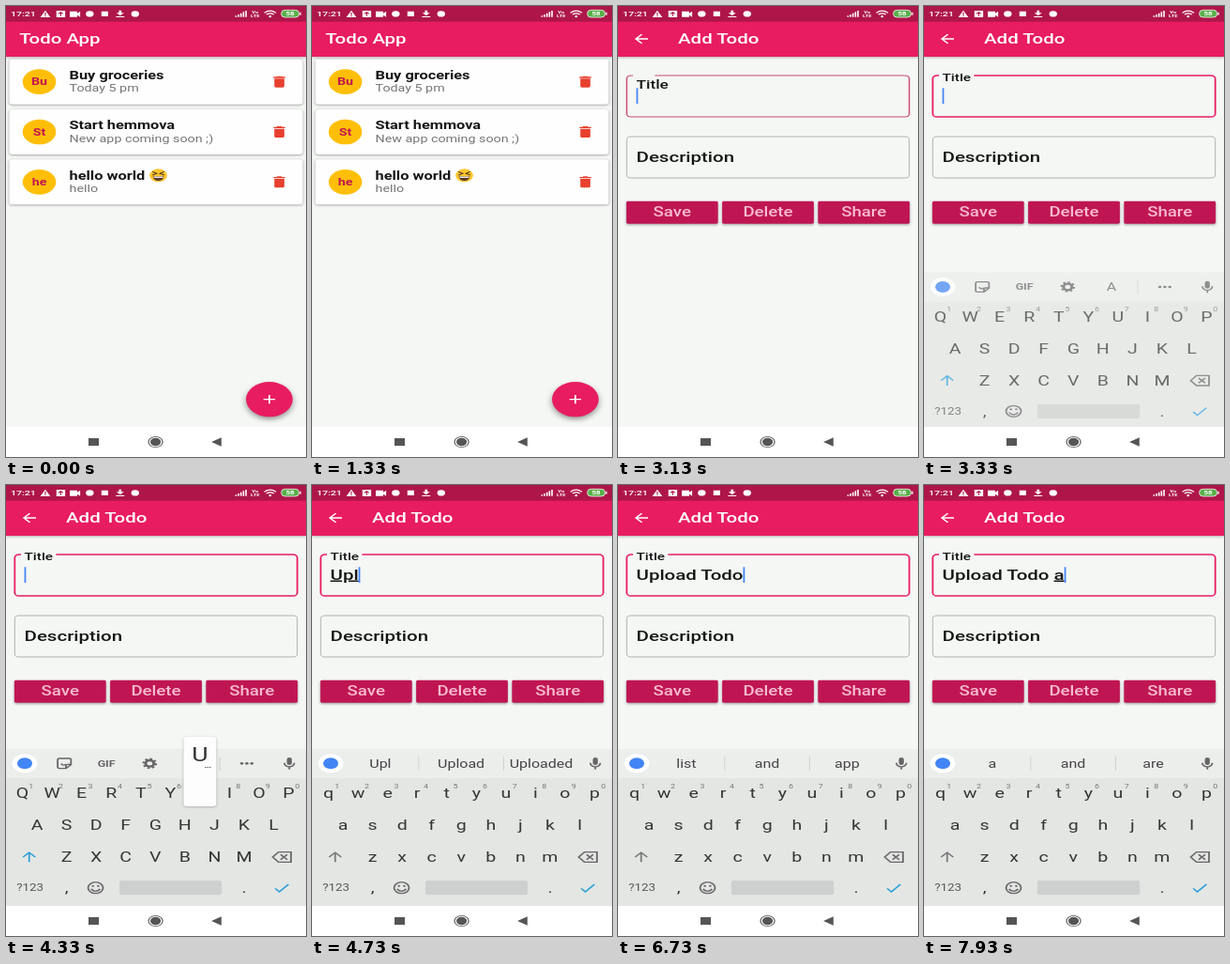
Write an HTML page that moves like this. It is 320 px wide and 480 px high and loops after 8000 ms.

```html
<!DOCTYPE html>
<html lang="en">
<head>
<meta charset="utf-8">
<title>Todo app</title>
<style>
  html, body { margin: 0; height: 100%; overflow: hidden; background: #f5f7f5; }
  svg { display: block; width: 100vw; height: 100vh; font-family: Roboto, sans-serif; }
  text { white-space: pre; }
  .bar { fill: #e81c60; filter: drop-shadow(0 1px 2px #0005); }
  .heading { font-size: 23px; font-weight: 500; fill: #fff; }
  .card { fill: #fdfefd; filter: drop-shadow(0 1px 1.5px #0006); }
  .name { font-size: 18.4px; font-weight: 700; fill: #161616; }
  .note { font-size: 16.1px; fill: #757575; }
  .badge { font-size: 16px; font-weight: 700; fill: #c4144f; }
  .button { fill: #bf1653; filter: drop-shadow(0 2px 1.5px #0005); }
  .caption { font-size: 21px; font-weight: 500; fill: #f8bbd0; }
  .field { font-size: 23px; font-weight: 500; fill: #141614; }
  .word { font-size: 18px; fill: #444; }
  .key { font-size: 22px; fill: #343634; }
  .hint { font-size: 10px; fill: #777; }
  .mid { text-anchor: middle; }
  .line { fill: none; stroke: #666; stroke-width: 2; }
</style>
</head>
<body>
<!-- Laid out on a 360 x 720 phone screen, squeezed onto the stage -->
<svg viewBox="0 0 360 720" preserveAspectRatio="none">
  <g id="listPage">
    <rect width="360" height="720" fill="#f5f7f5"/>
    <rect class="bar" width="360" height="81"/>
    <text class="heading" x="16" y="60.5">Todo App</text>
    <g id="cards"></g>
    <g transform="translate(182.8 270.5)" fill="none" stroke="#4e3322" stroke-width="1.5">
      <circle r="10.5" fill="#fcc62f" stroke="none"/>
      <path d="M-7-6l5 3-5 2.500M7-6l-5 3 5 2.500"/>
      <path d="M-6.500 1.500h13a6.500 7 0 0 1-13 0z" fill="#5b3a28" stroke="none"/>
      <path d="M-5.500 2.800h11" stroke="#fff" stroke-width="2"/>
    </g>
    <circle cx="316" cy="628" r="28" fill="#e81c60" style="filter:drop-shadow(0 4px 4px #0006)"/>
    <path d="M309 628h14M316 621v14" stroke="#fff" stroke-width="2"/>
  </g>

  <g id="addPage">
    <rect width="360" height="720" fill="#f5f7f5"/>
    <rect class="bar" width="360" height="81"/>
    <path transform="translate(16 40.500)" fill="#fff" d="M20 11H7.830l5.590-5.590L12 4l-8 8 8 8 1.410-1.410L7.830 13H20z"/>
    <text class="heading" x="72" y="60.5">Add Todo</text>
    <path id="titleBorder" fill="none"/>
    <path id="descBorder" fill="none" stroke="#9c9e9c"/>
    <text class="field" id="label">Title</text>
    <text class="field" x="22" y="249">Description</text>
    <text class="field" x="22" y="151"><tspan id="typed"></tspan><tspan id="composing" text-decoration="underline"></tspan></text>
    <rect id="cursor" y="131" width="2" height="25" fill="#4285f4"/>
    <g id="buttons"></g>
  </g>

  <g id="keyboard">
    <rect y="421.500" width="360" height="260" fill="#e4e6e4"/>
    <rect y="421.500" width="360" height="46.500" fill="#eceeec"/>
    <circle cx="22.500" cy="444.500" r="15" fill="#fff"/>
    <circle cx="22.500" cy="444.500" r="9" fill="#4285f4"/>
    <g id="tools">
      <g class="line" stroke-width="1.700">
        <path d="M64 436.500h12q2 0 2 2v8l-6 6h-8q-2 0-2-2v-12q0-2 2-2zM78 446h-4q-2 0-2 2v4M66 445q3 4 6 1"/>
        <circle cx="172.500" cy="444.500" r="5" stroke-width="3.500"/>
        <circle cx="172.500" cy="444.500" r="7.500" stroke-width="2.500" pathLength="16" stroke-dasharray="1"/>
        <path d="M256.500 434v22" stroke="#c8cac8" stroke-width="1"/>
      </g>
      <text class="mid" x="120.500" y="449.500" font-size="14" font-weight="700" fill="#666">GIF</text>
      <text class="mid" x="225" y="451" font-size="18" fill="#666">A</text>
      <g fill="#666"><circle cx="283" cy="444.500" r="2"/><circle cx="289" cy="444.500" r="2"/><circle cx="295" cy="444.500" r="2"/></g>
    </g>
    <g id="words"><path d="M128 433v23M230 433v23" stroke="#cbcdcb"/></g>
    <rect x="337" y="435" width="6" height="12" rx="3" fill="#666"/>
    <path class="line" d="M334 443.500a6 6.500 0 0 0 12 0M340 450v4"/>
    <g id="keys"></g>
    <path id="shift" class="line" d="M27.800 602v-14M20.500 594l7.300-7.300 7.300 7.300"/>
    <path class="line" stroke-width="1.700" d="M327 586h15v16h-15l-7-8zM329.500 590l8 8M337.500 590l-8 8"/>
    <text class="mid" x="28.700" y="648.500" font-size="15" fill="#555">?123</text>
    <text class="key mid" x="72.700" y="651">,</text>
    <text class="key mid" x="286" y="651">.</text>
    <g class="line" stroke-width="1.700"><circle cx="107.500" cy="643" r="9"/><path d="M102 645q5.500 7 11 0"/></g>
    <circle cx="104.300" cy="640" r="1.500" fill="#666"/><circle cx="110.700" cy="640" r="1.500" fill="#666"/>
    <rect x="136" y="631.500" width="123" height="23" rx="3" fill="#cdd0ce"/>
    <path class="line" d="M323 644l5 5.500 11-12" style="stroke:#2b9fd8"/>
    <g id="popup" class="mid">
      <rect x="-19.500" y="-98" width="39" height="111" rx="4" fill="#fcfdfc" style="filter:drop-shadow(0 1px 1.500px #0004)"/>
      <text id="popupLetter" y="-59" font-size="30" fill="#333"></text>
      <text x="9.500" y="-48" font-size="12" font-weight="700" fill="#555">…</text>
    </g>
  </g>

  <rect y="672" width="360" height="48" fill="#fff"/>
  <g fill="#555">
    <path d="M99 690h12.400v12H99zM258.500 689v14l-12-7z"/>
    <circle cx="179.500" cy="696" r="6.300"/>
    <circle cx="179.500" cy="696" r="8.500" fill="none" stroke="#555" stroke-width="1.300"/>
  </g>

  <rect width="360" height="25" fill="#ae1649"/>
  <g fill="#fff">
    <text x="5.500" y="17" font-size="12" font-weight="500">17:21</text>
    <path d="M47.200 7l6 11h-12zM60.500 7.500h10.500v10.500H60.500zM76.500 8.500h9v3l3.500-3v9l-3.500-3v3h-9zM114.500 8.500h8v8h-8zM135.500 7h3v4h3l-4.500 4.500-4.500-4.500h3zM132 16.500h10v1.500H132z"/>
    <circle cx="100.500" cy="12.700" r="4.700"/><circle cx="155" cy="12.700" r="4.700"/>
    <path d="M47.200 10.500v4M47.200 15.500v1.300M65.700 16v-6M63 12.500l2.700-2.700 2.700 2.700" fill="none" stroke="#ae1649" stroke-width="1.300"/>
    <path d="M276 17.500v-2M279 17.500v-4M282 17.500v-6M285 17.500v-8M288 17.500v-10" stroke="#fff" stroke-width="1.800"/>
    <g class="mid" font-size="6.500" font-weight="700"><text x="299" y="11.500">Vo</text><text x="299" y="18">LTE</text></g>
    <path d="M310 11q7-6.500 14 0M312.500 13.800q4.500-4 9 0" fill="none" stroke="#fff" stroke-width="1.600"/>
    <circle cx="317" cy="16.700" r="1.600"/>
    <rect x="330.500" y="6.500" width="21" height="11.500" rx="4.500" fill="#58b04a" stroke="#fff"/>
    <path d="M352.500 10h1.500v4.500h-1.500z"/>
    <text class="mid" x="341" y="15.600" font-size="9" font-weight="700">58</text>
  </g>
</svg>

<script>
const LOOP = 8000;
const $ = id => document.getElementById(id);

function add(parent, tag, attrs, text = "") {
  const el = document.createElementNS("http://www.w3.org/2000/svg", tag);
  for (const name in attrs) el.setAttribute(name, attrs[name]);
  el.textContent = text;
  return parent.appendChild(el);
}

const clamp = x => Math.min(1, Math.max(0, x));
const mix = (a, b, p) => a + (b - a) * p;

// cubic-bezier timing function, solved by bisection
const bezier = (x1, y1, x2, y2) => x => {
  if (x <= 0 || x >= 1) return clamp(x);
  const at = (a, b, s) => 3 * a * s * (1 - s) ** 2 + 3 * b * s * s * (1 - s) + s ** 3;
  let lo = 0, hi = 1;
  for (let i = 0; i < 20; i++) {
    const s = (lo + hi) / 2;
    if (at(x1, x2, s) < x) lo = s; else hi = s;
  }
  return at(y1, y2, lo);
};
const easeIn = bezier(.42, 0, 1, 1);
const fastOutSlowIn = bezier(.4, 0, .2, 1);

// Static parts
const todos = [
  ["Buy groceries", "Today 5 pm"],
  ["Start hemmova", "New app coming soon ;)"],
  ["hello world", "hello"]
];
todos.forEach(([name, note], i) => {
  const g = add($("cards"), "g", { transform: `translate(0 ${85 + 80 * i})` });
  add(g, "rect", { class: "card", x: 4, width: 352, height: 72, rx: 4 });
  add(g, "circle", { cx: 40, cy: 36, r: 20, fill: "#ffbf08" });
  add(g, "text", { class: "badge mid", x: 40, y: 41.7 }, name.slice(0, 2));
  add(g, "text", { class: "name", x: 76, y: 32 }, name);
  add(g, "text", { class: "note", x: 76, y: 52 }, note);
  add(g, "path", { transform: "translate(316 24)", fill: "#e8402f",
    d: "M6 19q0 2 2 2h8q2 0 2-2V7H6zM19 4h-3.5l-1-1h-5l-1 1H5v2h14z" });
});

["Save", "Delete", "Share"].forEach((caption, i) => {
  const x = 10 + 115 * i;
  add($("buttons"), "rect", { class: "button", x, y: 311.5, width: 110, height: 36, rx: 2 });
  add($("buttons"), "text", { class: "caption mid", x: x + 55, y: 336 }, caption);
});

const keys = {};
[["qwertyuiop", 19.7, 500], ["asdfghjkl", 37.2, 551], ["zxcvbnm", 72.7, 602]].forEach(([row, left, y], r) =>
  [...row].forEach((letter, i) => {
    const x = left + 35.5 * i;
    keys[letter] = { x, y, el: add($("keys"), "text", { class: "key mid", x, y }) };
    if (r === 0) add($("keys"), "text", { class: "hint mid", x: x + 10.5, y: 484 }, (i + 1) % 10);
  }));

const words = [82, 179, 275].map(x => add($("words"), "text", { class: "word mid", x, y: 451 }));

const outline = (y, gap) => `M${18 + gap} ${y}H344.500a5 5 0 0 1 5 5v56a5 5 0 0 1-5 5H15.500a5 5 0 0 1-5-5` +
  `V${y + 5}a5 5 0 0 1 5-5H18`;
$("descBorder").setAttribute("d", outline(208.5, 0));

// Typing: [time, committed text, composing text, suggestions]
const typing = [
  [0, "", "", ""],
  [4400, "", "U", "U You Up"],
  [4530, "", "Up", "Up Upload Update"],
  [4730, "", "Upl", "Upl Upload Uploaded"],
  [4930, "", "Uplo", "Uplo Upload Uploaded"],
  [5870, "Upload", "", "photos Todo videos"],
  [6670, "Upload Todo", "", "list and app"],
  [7930, "Upload Todo ", "a", "a and are"]
];
const presses = [[4270, 4400, "U"], [4470, 4530, "p"], [4670, 4730, "l"], [4870, 4930, "o"], [7870, 7930, "a"]];
const cursorOff = [[0, 3070], [3600, 4130], [5470, 5870], [6330, 6670], [7200, 7730]];
const during = (t, [from, to]) => t >= from && t < to;
const show = (el, on) => el.setAttribute("visibility", on ? "visible" : "hidden");

function drawPage(t) {
  const p = clamp((t - 2110) / 300);
  $("addPage").setAttribute("opacity", easeIn(p));
  $("addPage").setAttribute("transform", `translate(0 ${180 * (1 - fastOutSlowIn(p))})`);
}

function drawField(t, state) {
  const p = fastOutSlowIn(clamp((t - 3050) / 200));
  $("label").setAttribute("transform", `translate(22 ${mix(151.5, 120, p)}) scale(${mix(1, .75, p)})`);
  const border = $("titleBorder");
  border.setAttribute("d", outline(111, 42 * p));
  border.setAttribute("stroke", `rgb(${mix(156, 232, p)} ${mix(158, 28, p)} ${mix(156, 96, p)})`);
  border.setAttribute("stroke-width", mix(1, 2, p));
  $("typed").textContent = state[1];
  $("composing").textContent = state[2];
  $("cursor").setAttribute("x", 22 + $("typed").parentNode.getComputedTextLength());
  show($("cursor"), !cursorOff.some(span => during(t, span)));
}

function drawKeyboard(t, state) {
  const p = clamp((t - 3180) / 210);
  $("keyboard").setAttribute("opacity", p);
  $("keyboard").setAttribute("transform", `translate(0 ${50 * (1 - p) ** 2})`);

  const upper = t < 4400;
  for (const letter in keys) keys[letter].el.textContent = upper ? letter.toUpperCase() : letter;
  $("shift").style.stroke = upper ? "#2b9fd8" : "#777";
  show($("tools"), !state[3]);
  show($("words"), state[3]);
  state[3].split(" ").forEach((word, i) => words[i].textContent = word);

  const press = presses.find(span => during(t, span));
  show($("popup"), press);
  if (press) {
    const { x, y } = keys[press[2].toLowerCase()];
    $("popup").setAttribute("transform", `translate(${x} ${y})`);
    $("popupLetter").textContent = press[2];
  }
}

function frame() {
  const t = performance.now() % LOOP;
  const state = typing.findLast(step => t >= step[0]);
  drawPage(t);
  drawField(t, state);
  drawKeyboard(t, state);
  requestAnimationFrame(frame);
}
frame();
</script>
</body>
</html>
```
